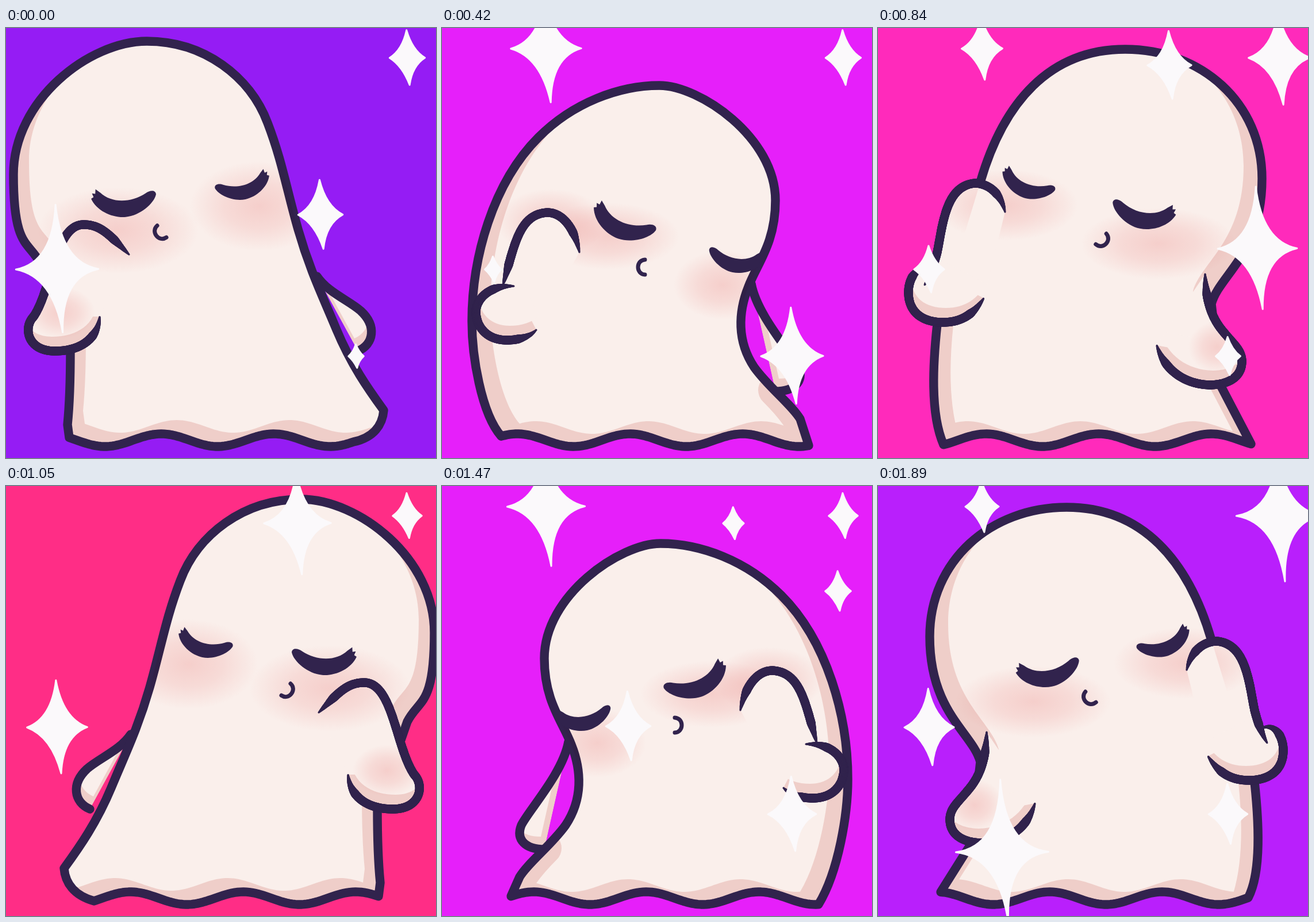
These frames come from a looping animation (748x748 px, 2.1 s). An HTML page with a canvas:

```html
<!DOCTYPE html>
<html lang="en">
<head>
<meta charset="utf-8">
<title>Dancing ghost</title>
<style>
  html, body { margin: 0; width: 100%; height: 100%; overflow: hidden; }
  /* Poses sit side by side; the strip swings across them and back. */
  #strip { display: block; height: 100vh; animation: swing 2.1s step-end infinite; }
  @keyframes swing {
    0%, 100% { transform: translateX(0); }
    10%, 90% { transform: translateX(calc(-100% / 6)); }
    20%, 80% { transform: translateX(calc(-200% / 6)); }
    30%, 70% { transform: translateX(calc(-300% / 6)); }
    40%, 60% { transform: translateX(calc(-400% / 6)); }
    50% { transform: translateX(calc(-500% / 6)); }
  }
</style>
</head>
<body>
<canvas id="strip" width="4488" height="748"></canvas>
<script>
  const SIZE = 748, MIRROR = 758, LINE = 15.4;
  const INK = '#31234d', LIGHT = '#faefeb', SHADE = '#efcec9', WHITE = '#fbf9fb';
  const ctx = document.getElementById('strip').getContext('2d');
  const ruler = document.createElementNS('http://www.w3.org/2000/svg', 'path');

  // hem: x range of the wavy edge; side: the outline from its right end back to its left.
  // Arms are [arch, hand, open]; an open arm has a gap between its two strokes.
  const lean = {
    hem: [110, 605],
    side: 'C640 712 655 690 657 665C630 628 600 585 575 525S528 420 508 350S480 230 455 165C425 85 345 23 245 23S13 125 13 255S40 370 60 410L112 560Q112 640 107 690',
    glow: [27, -24],
    back: 'M541 432C560 460 595 473 617 492C645 518 640 550 612 562',
    arms: [['M214 394C180 360 165 342 135 342C85 342 80 455 48 502', 'M48 502C30 520 36 562 85 562C130 562 160 540 163 502']],
    blush: [[195, 352, 140, 75], [440, 310, 120, 78], [95, 495, 60, 45]],
    eyes: [[205, 292, -1.12, -5], [410, 267, .96, -12]],
    mouth: [271, 354, 142]
  };
  const tilt = {
    hem: [109, 645],
    side: 'C668 670 662 580 655 515L580 268C540 130 460 37 328 37S90 130 90 262S165 430 178 480L162 622',
    glow: [32, -22],
    edge: 'M655 515Q668 640 645 716',
    arms: [
      ['M189 428C188 470 180 500 160 525C140 550 125 560 125 580', 'M125 580C125 605 145 620 180 621C225 620 260 595 273 552'],
      ['M537 320C545 285 568 270 590 270C640 275 645 340 655 390Q664 425 677 447', 'M668 421C690 412 705 435 705 460C705 495 680 512 645 512C610 512 590 495 574 470', true]
    ],
    blush: [[270, 375, 135, 62], [535, 308, 125, 62], [168, 555, 50, 45]],
    eyes: [[295, 313, -1.11, -12], [495, 265, .96, -18]],
    mouth: [370, 367, 135]
  };
  const dip = {
    hem: [120, 657],
    side: 'C690 670 706 570 706 510C706 400 670 270 590 190C530 130 450 100 380 100S178 190 178 300C178 375 210 410 225 450C243 495 245 545 215 590C190 625 150 655 135 680',
    glow: [-32, -22],
    edge: 'M180 630Q130 680 122 714',
    back: 'M220 445C210 500 150 565 138 590C128 615 145 632 178 632',
    arms: [['M519 390C528 345 550 321 575 321C625 324 632 380 652 447', 'M633 449C675 447 697 470 699 492C699 520 680 543 645 543C625 543 605 537 594 525', true]],
    blush: [[270, 447, 85, 60], [470, 362, 125, 58], [568, 338, 95, 58], [635, 482, 55, 48]],
    eyes: [[246, 394, -.96, -12], [439, 331, 1.14, -19]],
    mouth: [405, 416, 0]
  };

  const steps = [
    ['#951cf4', lean], ['#b91ffc', tilt], ['#e61ffa', dip, true],
    ['#e61ffa', dip], ['#ff2abb', tilt, true], ['#ff2d86', lean, true]
  ];

  // Each star swells to its peak at one step: x, y, step, peak, reach.
  const twinkles = [
    [181, 36, 2.6, 83, 2.5], [507, 65, 5, 60, 2.9],
    [698, 52, 1, 77, 1.7], [698, 52, 4, 55, 1.9],
    [89, 420, 0, 74, 2.5], [89, 420, 5, 54, 2],
    [609, 571, 2.2, 60, 2.85], [547, 325, 0, 40, 1],
    [216, 637, 1, 83, 1], [324, 418, 3, 40, 1],
    [689, 183, 3, 23, 1], [660, 384, 4, 71, 1]
  ];

  const eye = new Path2D('M-50 2C-50-6-40-5-34-1C-10 12 20 10 36-8L43-14L44-7L49-8L47-2L51 0C44 20 20 33 0 33C-22 33-46 16-50 2Z');
  const mouth = new Path2D('M0-13C16-12 16 12 0 13');

  function scoped(draw) {
    ctx.save();
    draw();
    ctx.restore();
  }

  function fill(path, color) {
    ctx.fillStyle = color;
    ctx.fill(path);
  }

  function stroke(path, width, color = INK) {
    ctx.lineWidth = width;
    ctx.strokeStyle = color;
    ctx.stroke(path);
  }

  // Lit area: the same shape moved, cut to the shape itself.
  function shaded(path, [dx, dy], clip = path) {
    scoped(() => {
      ctx.clip(clip);
      fill(path, SHADE);
      ctx.translate(dx, dy);
      fill(path, LIGHT);
    });
  }

  // Pen line that thins towards its free ends.
  function brush(d, freeStart, freeEnd) {
    ruler.setAttribute('d', d);
    const length = ruler.getTotalLength();
    const taper = (s, free) => free ? Math.min(1, (s + 9) / 45) : 1;
    ctx.fillStyle = INK;
    for (let s = 0; s <= length; s++) {
      const p = ruler.getPointAtLength(s);
      ctx.beginPath();
      ctx.arc(p.x, p.y, LINE / 2 * taper(s, freeStart) * taper(length - s, freeEnd), 0, 7);
      ctx.fill();
    }
  }

  function bodyPath({ hem: [left, right], side }, crest) {
    const points = [];
    for (let x = left; x <= right; x += 5) {
      points.push(`${x} ${717 - 11 * Math.cos((x - crest) * Math.PI * 2 / 196)}`);
    }
    return new Path2D(`M${points.join('L')}${side}Z`);
  }

  function blush([x, y, rx, ry]) {
    scoped(() => {
      ctx.translate(x, y);
      ctx.scale(rx, ry);
      const g = ctx.createRadialGradient(0, 0, 0, 0, 0, 1);
      [.55, .34, 0].forEach((a, i) => g.addColorStop(i / 2, `rgba(246,192,192,${a})`));
      ctx.fillStyle = g;
      ctx.fillRect(-1, -1, 2, 2);
    });
  }

  function ghost(pose, crest) {
    const body = bodyPath(pose, crest);
    const skin = new Path2D(body);

    if (pose.back) {
      shaded(new Path2D(pose.back), [-6, -22]);
      stroke(new Path2D(pose.back), LINE);
    }

    shaded(body, pose.glow);
    if (pose.edge) scoped(() => {
      ctx.clip(body);
      stroke(new Path2D(pose.edge), 56, SHADE);
    });
    stroke(body, LINE);

    for (const [arch, hand] of pose.arms) {
      const arm = new Path2D(arch + hand.replace('M', 'L') + 'Z');
      fill(arm, LIGHT);
      shaded(new Path2D(hand), [-5, -25], arm);
      skin.addPath(arm);
    }

    scoped(() => {
      ctx.clip(skin);
      ctx.globalCompositeOperation = 'multiply';
      pose.blush.forEach(blush);
    });

    for (const [arch, hand, open] of pose.arms) {
      brush(arch, true, open);
      brush(hand, open, true);
    }

    scoped(() => {
      ctx.clip(body);
      for (const [x, y, size, turn] of pose.eyes) scoped(() => {
        ctx.translate(x, y);
        ctx.rotate(turn * Math.PI / 180);
        ctx.scale(size, Math.abs(size));
        fill(eye, INK);
      });
      const [x, y, turn] = pose.mouth;
      ctx.translate(x, y);
      ctx.rotate(turn * Math.PI / 180);
      stroke(mouth, 7);
    });
  }

  // Larger stars are more pinched.
  function star(x, y, r) {
    const c = .4 - .004 * r;
    const shape = new Path2D(
      `M-.04-1.52Q${c} ${-1.6 * c} .97-.01Q${c} ${1.6 * c} .13 1.48Q${-c} ${1.6 * c}-.97 0Q${-c} ${-1.6 * c}-.04-1.52Z`);
    scoped(() => {
      ctx.translate(x, y);
      ctx.scale(r, r);
      fill(shape, WHITE);
      stroke(shape, 3 / r, WHITE);
    });
  }

  ctx.lineJoin = ctx.lineCap = 'round';
  steps.forEach(([sky, pose, flip], k) => scoped(() => {
    ctx.translate(k * SIZE, 0);
    ctx.beginPath();
    ctx.rect(0, 0, SIZE, SIZE);
    ctx.clip();
    ctx.fillStyle = sky;
    ctx.fillRect(0, 0, SIZE, SIZE);

    // The hem wave drifts steadily to the right, whichever way the ghost faces.
    const crest = 270 + 28.5 * k;
    scoped(() => {
      if (flip) ctx.transform(-1, 0, 0, 1, MIRROR, 0);
      ghost(pose, flip ? MIRROR - crest : crest);
    });

    for (const [x, y, step, peak, reach] of twinkles) {
      const r = peak * (1 - Math.abs(k - step) / reach);
      if (r > 5) star(x, y, r);
    }
  }));
</script>
</body>
</html>
```
